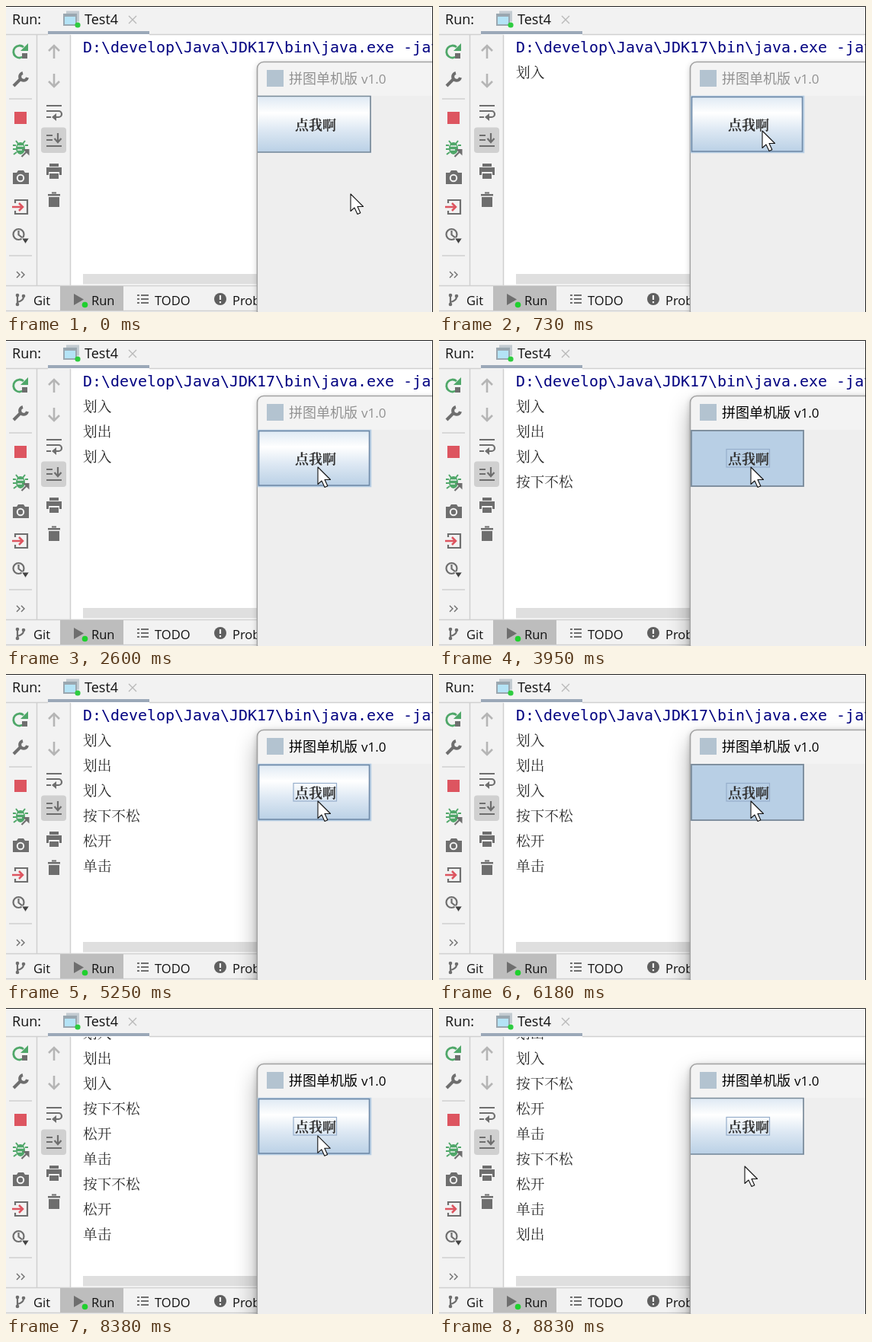
Recreate the animation shown at these times as an HTML page. Size 560x402 px, loop 9030 ms.

```html
<!DOCTYPE html>
<html lang="zh">
<head>
<meta charset="utf-8">
<title>Console and button</title>
<style>
html, body { margin: 0; width: 100%; height: 100%; overflow: hidden; background: #f2f2f2; }
svg { display: block; width: 560px; height: 402px; }
text { white-space: pre; }
.ui { font-family: 'Open Sans', 'Noto Sans', sans-serif; font-size: 18px; fill: #111; }
.tool { font-size: 16.5px; }
.cmd { font-family: 'DejaVu Sans Mono', 'Noto Sans Mono', monospace; font-size: 19.95px; fill: #000080; }
.row { font-family: 'Noto Serif CJK SC', 'Noto Sans CJK SC', 'Noto Sans CJK', serif; font-size: 18.7px; font-weight: 300; fill: #2a2a2a; }
.cjk { font-family: 'Noto Sans CJK SC', 'Noto Sans CJK', sans-serif; font-size: 18px; }
.bold { font-family: 'Noto Serif CJK SC', 'Noto Sans CJK SC', 'Noto Sans CJK', serif; font-size: 18px; font-weight: 700; fill: #333; }
.line { fill: none; stroke: #6e6e6e; stroke-width: 2.2; }
.gray { fill: #6e6e6e; }
.soft { fill: none; stroke: #b5b5b5; stroke-width: 2.6; }
.sep { fill: none; stroke: #d0d0d0; stroke-width: 1.5; }
</style>
</head>
<body>
<svg viewBox="0 0 560 402" xmlns="http://www.w3.org/2000/svg">
  <defs>
    <linearGradient id="steel" x1="0" y1="0" x2="0" y2="1">
      <stop offset="0" stop-color="#dde8f3"/>
      <stop offset=".3" stop-color="#fff"/>
      <stop offset=".6" stop-color="#dde8f3"/>
      <stop offset="1" stop-color="#b8cfe5"/>
    </linearGradient>
    <filter id="wide" x="-30%" y="-30%" width="160%" height="160%"><feGaussianBlur stdDeviation="15"/></filter>
    <filter id="thin" x="-30%" y="-30%" width="160%" height="160%"><feGaussianBlur stdDeviation="4"/></filter>
    <clipPath id="pane"><rect x="86" y="38" width="474" height="314"/></clipPath>
  </defs>

  <rect width="560" height="402" fill="#f2f2f2"/>

  <!-- console -->
  <rect x="85" y="37" width="475" height="330" fill="#fff"/>
  <g clip-path="url(#pane)">
    <g id="log"><text class="cmd" x="101" y="61">D:\develop\Java\JDK17\bin\java.exe -javaagent</text></g>
  </g>
  <rect x="101" y="352" width="459" height="13.5" fill="#dfdfdf"/>

  <!-- header -->
  <text class="ui" x="8" y="24">Run:</text>
  <rect x="55" y="33" width="133" height="4" fill="#9ba8b8"/>
  <path class="sep" d="M0 37.5H55M188 37.5H560"/>
  <rect x="79" y="6.5" width="17" height="14" fill="#c3cbd1"/>
  <rect x="75" y="10" width="18" height="16" fill="#9aa7b0"/>
  <rect x="77" y="14" width="14" height="10" fill="#b4e3f6"/>
  <circle cx="94" cy="25" r="3.6" fill="#2ecc40"/>
  <text class="ui" x="103" y="24">Test4</text>
  <path d="M161 13l10 10m0-10l-10 10" stroke="#b9b9b9" stroke-width="1.4"/>

  <!-- side bars -->
  <path class="sep" d="M40.5 38V367M84.5 38V367M4 122H34M4 328H34"/>
  <path d="M24 65a8 8 0 1 1 -1-11" fill="none" stroke="#4fa769" stroke-width="2.8"/>
  <path d="M29 49v10H19z" fill="#4fa769"/>
  <rect x="21" y="62" width="7" height="7" class="gray"/>
  <path d="M10 105L20 95" stroke="#6e6e6e" stroke-width="4"/>
  <path d="M22 88a5 5 0 1 0 6 6" fill="none" stroke="#6e6e6e" stroke-width="4"/>
  <rect x="11" y="139" width="16" height="16" fill="#dd5560"/>
  <g stroke="#4fa769" stroke-width="2" fill="none">
    <path d="M13 177l3 4m9-4l-3 4M9 183h4m12 0h4M9 188h4M10 195l4-3"/>
    <ellipse cx="19" cy="187" rx="5" ry="7" fill="#4fa769"/>
    <path d="M15 184h8M15 189h6" stroke="#f2f2f2" stroke-width="1.3"/>
  </g>
  <path d="M22 188h8.500v8.500z" class="gray"/>
  <path class="line" d="M20.500 198l7-7"/>
  <path d="M9 219h5l2-3h7l2 3h5v15H9z" class="gray"/>
  <circle cx="19" cy="226" r="4.200" fill="#6e6e6e" stroke="#f2f2f2" stroke-width="2"/>
  <path class="line" d="M12 259v-4h16v18H12v-4"/>
  <path d="M8 264h13M17 259l5 5l-5 5" fill="none" stroke="#dd5560" stroke-width="2.500"/>
  <circle class="line" cx="16.500" cy="300" r="7"/>
  <path class="line" d="M16.500 295v5.500l5 4"/>
  <path d="M20.500 305h10l-5 7.500z" fill="#444" stroke="#f2f2f2"/>
  <path d="M14 349l4 4l-4 4m6-8l4 4l-4 4" fill="none" stroke="#6e6e6e" stroke-width="1.400"/>

  <path class="soft" d="M63 69V52M56 59l7-7l7 7M63 89v17M56 99l7 7l7-7"/>
  <path class="line" d="M53 131h20M53 138h16a4 4 0 0 1 0 8h-6M53 146h6"/>
  <path d="M66 141v10l-6-5z" class="gray"/>
  <rect x="46" y="159.500" width="33" height="33.500" rx="4" fill="#d0d0d0"/>
  <path class="line" d="M53 170h8M53 176h8M53 184h20M68 167v11M63.500 174l4.500 5l4.500-5"/>
  <path d="M57 207h12v4H57zM53 212h20v10h-3v-4H56v4h-3zM57 220h12v7H57z" class="gray"/>
  <path d="M55 247h16v2.500H55zM60 244.500h6v2h-6zM56 251h14v13H56z" class="gray"/>

  <!-- bottom bar -->
  <rect y="367" width="560" height="35" fill="#f2f2f2"/>
  <path class="sep" d="M0 367.500H560M0 400.500H560"/>
  <rect x="71" y="368" width="83" height="32" fill="#bdbdbd"/>
  <path class="line" d="M15 381v11M23 382q0 5-8 7"/>
  <g class="gray"><circle cx="15" cy="380" r="2.300"/><circle cx="23" cy="381" r="2.300"/><circle cx="15" cy="392" r="2.300"/></g>
  <text class="ui tool" x="36" y="392.500">Git</text>
  <path d="M89 378l13 7.500l-13 7.500z" class="gray"/>
  <circle cx="103.500" cy="392.500" r="3.800" fill="#1fd02e"/>
  <text class="ui tool" x="112" y="392.500">Run</text>
  <path class="line" d="M172 380h3m2 0h10M172 385h3m2 0h10M172 390h3m2 0h10"/>
  <text class="ui tool" x="195" y="392.500">TODO</text>
  <circle cx="281" cy="385" r="8" fill="#5f5f5f"/>
  <path d="M281 380v6m0 2v2.200" stroke="#f2f2f2" stroke-width="2.200"/>
  <text class="ui tool" x="297" y="392.500">Problems</text>

  <!-- window -->
  <rect x="330" y="76" width="260" height="360" rx="8" opacity=".25" filter="url(#thin)"/>
  <rect id="glow" x="330" y="88" width="260" height="360" rx="8" filter="url(#wide)"/>
  <path d="M329.500 402V82a8.500 8.500 0 0 1 8.500-8.500H560V402z" fill="#f3f3f3" stroke="#a2a2a2" stroke-width="1.600"/>
  <rect x="330.300" y="118" width="230" height="284" fill="#eee"/>
  <rect x="342" y="84" width="22" height="22" fill="#b3c3d0"/>
  <g id="title">
    <text class="cjk" x="371" y="102">拼图单机版</text>
    <text class="ui" x="466" y="102" style="fill:inherit;font-size:17px">v1.0</text>
  </g>

  <!-- button -->
  <rect id="face" x="330" y="118" width="149" height="75"/>
  <path id="plain" d="M330 118.500H478V192H330" fill="none" stroke="#7a8a99" stroke-width="1.700"/>
  <g id="hover" fill="none">
    <rect x="331" y="119" width="147" height="73" stroke="#b8cfe5" stroke-width="2.600"/>
    <rect x="331.500" y="119.500" width="145" height="71.500" stroke="#6c87a5" stroke-width="1.500"/>
  </g>
  <rect id="down" x="331" y="119" width="147" height="73" fill="none" stroke="#7a8a99" stroke-width="1.800"/>
  <text class="bold" x="379" y="163">点我啊</text>
  <rect id="focus" x="377" y="143.500" width="56.500" height="23.500" fill="none" stroke="#96aecb" stroke-width="1.200"/>

  <path id="mouse" d="M0 0V22.500L5 18L9 26.500L12.800 24.800L9 16.500H16.500Z" fill="#fff" stroke="#111" stroke-width="1.100" stroke-linejoin="round"/>
  <path d="M0 .5H559.500V402" fill="none" stroke="#222"/>
</svg>

<script>
const LOOP = 9030, PITCH = 33;
const $ = id => document.getElementById(id);
const show = (el, on) => el.setAttribute('visibility', on ? 'visible' : 'hidden');
const clamp = x => Math.min(1, Math.max(0, x));

// time of printing, message
const rows = [
  [610, '划入'], [1460, '划出'], [2200, '划入'], [3340, '按下不松'],
  [4780, '松开'], [4800, '单击'], [6310, '按下不松'],
  [7400, '松开'], [7440, '单击'], [8780, '划出']
];
// start, end, steps, goal x, goal y
const moves = [
  [200, 730, 14, 424, 164], [1140, 1550, 11, 417, 235],
  [1870, 2280, 11, 409, 167], [8380, 8830, 12, 401, 208]
];
const presses = [[3130, 4560], [6100, 7160]];

const labels = rows.map(([, msg], i) => {
  const el = document.createElementNS('http://www.w3.org/2000/svg', 'text');
  el.setAttribute('class', 'row');
  el.setAttribute('x', 101);
  el.setAttribute('y', 94 + PITCH * i);
  el.textContent = msg;
  $('log').append(el);
  return el;
});

function pointer(t) {
  let x = 452, y = 247;
  for (const [from, to, n, gx, gy] of moves) {
    if (t < from) break;
    const k = Math.floor((t - from) / (to - from) * (n - 1) + .001) + 1;
    const p = clamp(k / n), e = p * p * (3 - 2 * p);
    x += (gx - x) * e;
    y += (gy - y) * e;
  }
  return [x, y];
}

function draw(t) {
  const [x, y] = pointer(t);
  const pressed = presses.some(([a, b]) => t >= a && t < b);
  const over = y < 193;
  const active = clamp((t - 3130) / 200);

  $('mouse').setAttribute('transform', `translate(${x.toFixed(1)} ${y.toFixed(1)})`);
  $('face').setAttribute('fill', pressed ? '#b8cfe5' : 'url(#steel)');
  show($('plain'), !over && !pressed);
  show($('hover'), over && !pressed);
  show($('down'), pressed);
  show($('focus'), t >= 3130);

  const c = Math.round(145 * (1 - active));
  $('title').setAttribute('fill', `rgb(${c},${c},${c})`);
  $('glow').setAttribute('opacity', .34 * active);

  const count = rows.filter(r => t >= r[0]).length;
  labels.forEach((el, i) => show(el, i < count));
  const scroll = Math.max(0, PITCH * (count - 8) + 21);
  $('log').setAttribute('transform', `translate(0 ${-scroll})`);
}

const start = performance.now();
function tick() {
  draw((performance.now() - start) % LOOP);
  requestAnimationFrame(tick);
}
tick();
</script>
</body>
</html>
```
